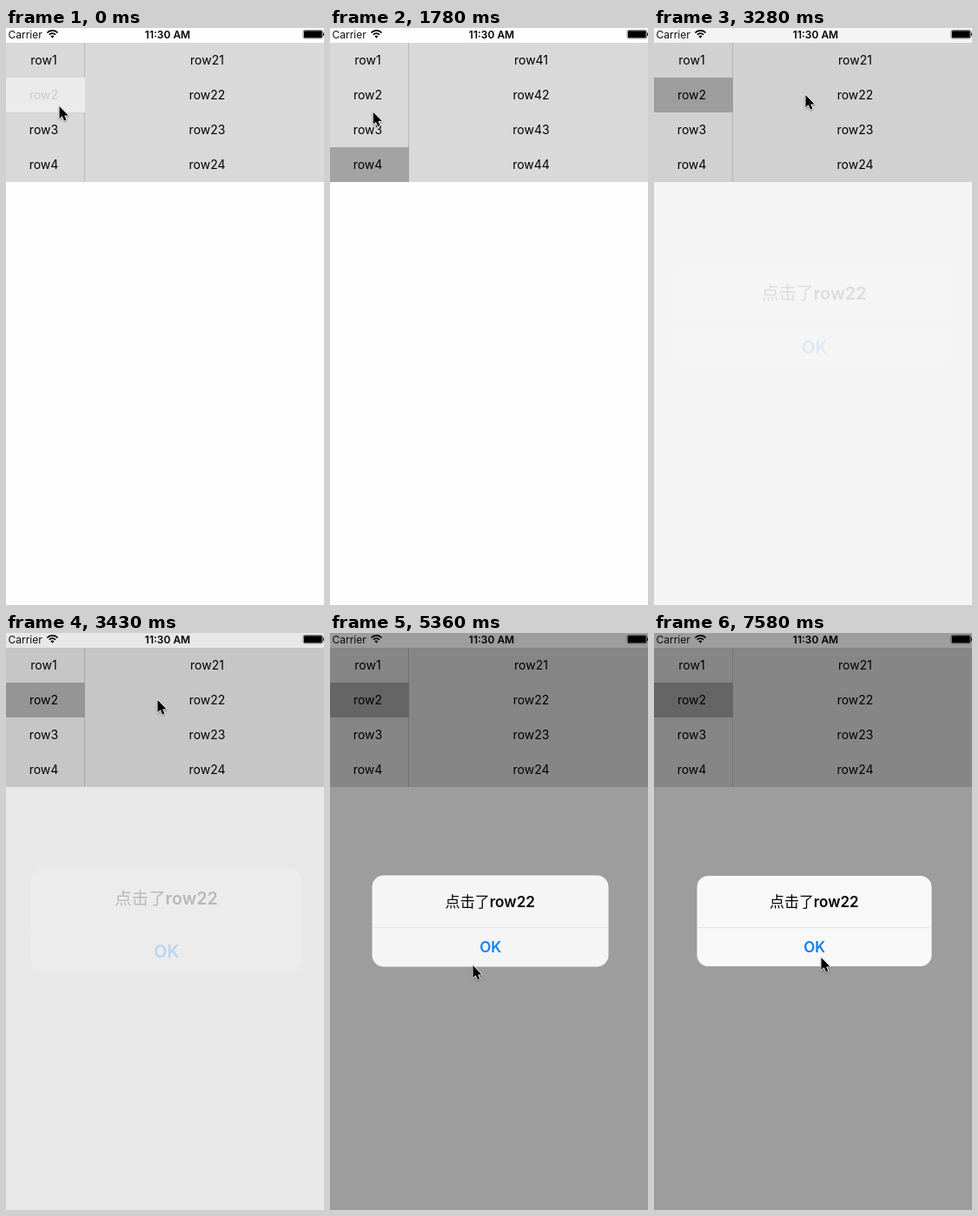
These frames come from a looping animation (366x663 px, 8 s). An HTML page with a canvas:

```html
<!DOCTYPE html>
<html lang="en">
<head>
<meta charset="utf-8">
<title>Linked menu and alert</title>
<style>
  html, body { margin: 0; width: 100%; height: 100%; overflow: hidden; background: #fefefe; }
  canvas { display: block; width: 366px; height: 663px; }
</style>
</head>
<body>
<canvas id="stage"></canvas>
<script>
const W = 366, H = 663, LOOP = 8000, TICK = 148.8, LAST = 51;
const SANS = "Inter, 'Noto Sans CJK SC', 'Noto Sans CJK', sans-serif";
const ROW_H = 40, TOP = 17, SPLIT = 91;

const canvas = document.getElementById("stage");
const ctx = canvas.getContext("2d");
const dpr = window.devicePixelRatio || 1;
canvas.width = W * dpr;
canvas.height = H * dpr;

// [tick, group, state of its cell]
const picks = [
  [0, 2, "flash"], [1, 2, "on"],
  [4, 3, "flash"], [5, 3, "on"],
  [9, 4, "flash"], [10, 4, "on"],
  [13, 2, "flash"], [15, 2, "on"]
];

// [tick, x, y] of the pointer tip
const path = [
  [0, 61.5, 90], [2, 61, 91], [4, 58, 114], [6, 52, 122], [8, 45.5, 149],
  [10, 46, 150], [13, 51, 78], [17, 51, 78], [19, 174.5, 77], [23, 174.5, 77],
  [27, 200.5, 391], [29, 196, 383], [32, 180, 380], [36, 164.5, 382],
  [42, 167.5, 383], [45, 231, 306], [46, 228, 305], [50, 192.5, 373], [51, 192.5, 373]
];

const gray = v => `rgb(${v},${v},${v})`;

function rect(x, y, w, h, fill) {
  ctx.fillStyle = fill;
  ctx.fillRect(x, y, w, h);
}

function label(str, x, y, size, weight, fill, align = "center") {
  ctx.font = `${weight} ${size}px ${SANS}`;
  ctx.textAlign = align;
  ctx.fillStyle = fill;
  ctx.fillText(str, x, y);
}

function statusBar() {
  label("Carrier", 2.5, 11.5, 12, 400, "#111", "left");
  label("11:30 AM", 186, 11.5, 12, 600, "#000");

  ctx.strokeStyle = "#000";
  ctx.lineWidth = 1.7;
  for (const r of [5, 8.3]) {
    ctx.beginPath();
    ctx.arc(53.4, 11.2, r, -Math.PI * 0.76, -Math.PI * 0.24);
    ctx.stroke();
  }
  ctx.fillStyle = "#000";
  ctx.beginPath();
  ctx.moveTo(53.4, 11.8);
  ctx.arc(53.4, 11.2, 2.6, -Math.PI * 0.78, -Math.PI * 0.22);
  ctx.fill();

  ctx.lineWidth = 0.7;
  ctx.strokeStyle = "#555";
  ctx.beginPath();
  ctx.roundRect(342, 2.5, 22.6, 9.4, 1.8);
  ctx.stroke();
  ctx.fillStyle = "#000";
  ctx.beginPath();
  ctx.roundRect(342.9, 3.2, 20.8, 8, 1);
  ctx.fill();
  rect(365, 5.5, 1, 3.5, "#222");
}

function cell(str, row, x, w, textX, state) {
  const y = TOP + (row - 1) * ROW_H;
  if (state) rect(x, y, w, ROW_H, gray(state === "on" ? 163 : 235));
  label(str, textX, y + 25, 14, 400, state === "flash" ? gray(202) : "#000");
}

function menus(k) {
  const [, group, state] = picks.findLast(p => p[0] <= k);
  rect(0, TOP, W, ROW_H * 4, gray(217));
  rect(SPLIT - 1, TOP, 1, ROW_H * 4, gray(186));
  for (let i = 1; i <= 4; i++) {
    const tapped = i === 2 && (k === 20 || k === 21);
    cell("row" + i, i, 0, SPLIT, 43.5, i === group && state);
    cell("row" + group + i, i, SPLIT, W - SPLIT, 231.5, tapped && "flash");
  }
}

// Critically damped spring: distance left to rest, 1 to 0
function spring(ms) {
  const wt = Math.max(0, ms) * 0.0022;
  return (1 + wt) * Math.exp(-wt);
}

function alertBox(k) {
  if (k < 22) return;
  const left = spring(k * TICK - 3030);
  const scale = 1 + 0.2 * left;
  rect(0, 0, W, H, `rgba(0,0,0,${Math.min(0.385, 0.4 * (1 - left))})`);

  ctx.save();
  ctx.globalAlpha = 1 - left;
  ctx.translate(184.5, 331);
  ctx.scale(scale, scale);
  ctx.fillStyle = gray(248);
  ctx.beginPath();
  ctx.roundRect(-135, -52, 270, 104, 13);
  ctx.fill();
  rect(-135, 7, 270, 0.8, gray(222));
  label("点击了", -51.5, -16, 17, 500, "#000", "left");
  label("row22", -0.8, -16, 17, 600, "#000", "left");
  label("OK", 0.3, 36.2, 17, 600, "#087cf8");
  ctx.restore();
}

function pointerAt(k) {
  const i = Math.max(1, path.findIndex(p => p[0] >= k));
  const [k0, x0, y0] = path[i - 1], [k1, x1, y1] = path[i];
  const u = (k - k0) / (k1 - k0), e = u * u * (3 - 2 * u);
  return [x0 + (x1 - x0) * e, y0 + (y1 - y0) * e];
}

function pointer(k) {
  const arrow = new Path2D("M0 0V14.2L3.2 11.3L5.5 16.4L7.9 15.4L5.7 10.4H10.2Z");
  ctx.save();
  ctx.translate(...pointerAt(k));
  ctx.lineWidth = 1.5;
  ctx.lineJoin = "round";
  ctx.strokeStyle = "#fff";
  ctx.shadowColor = "rgba(0,0,0,0.4)";
  ctx.shadowBlur = 2 * dpr;
  ctx.shadowOffsetY = dpr;
  ctx.stroke(arrow);
  ctx.shadowColor = "transparent";
  ctx.fillStyle = "#000";
  ctx.fill(arrow);
  ctx.restore();
}

function draw(now) {
  const k = Math.min(LAST, Math.floor((now % LOOP + 10) / TICK));
  ctx.setTransform(dpr, 0, 0, dpr, 0, 0);
  rect(0, 0, W, H, "#fefefe");
  statusBar();
  menus(k);
  alertBox(k);
  pointer(k);
}

const start = performance.now();
function loop() {
  draw(performance.now() - start);
  requestAnimationFrame(loop);
}
loop();
</script>
</body>
</html>
```
